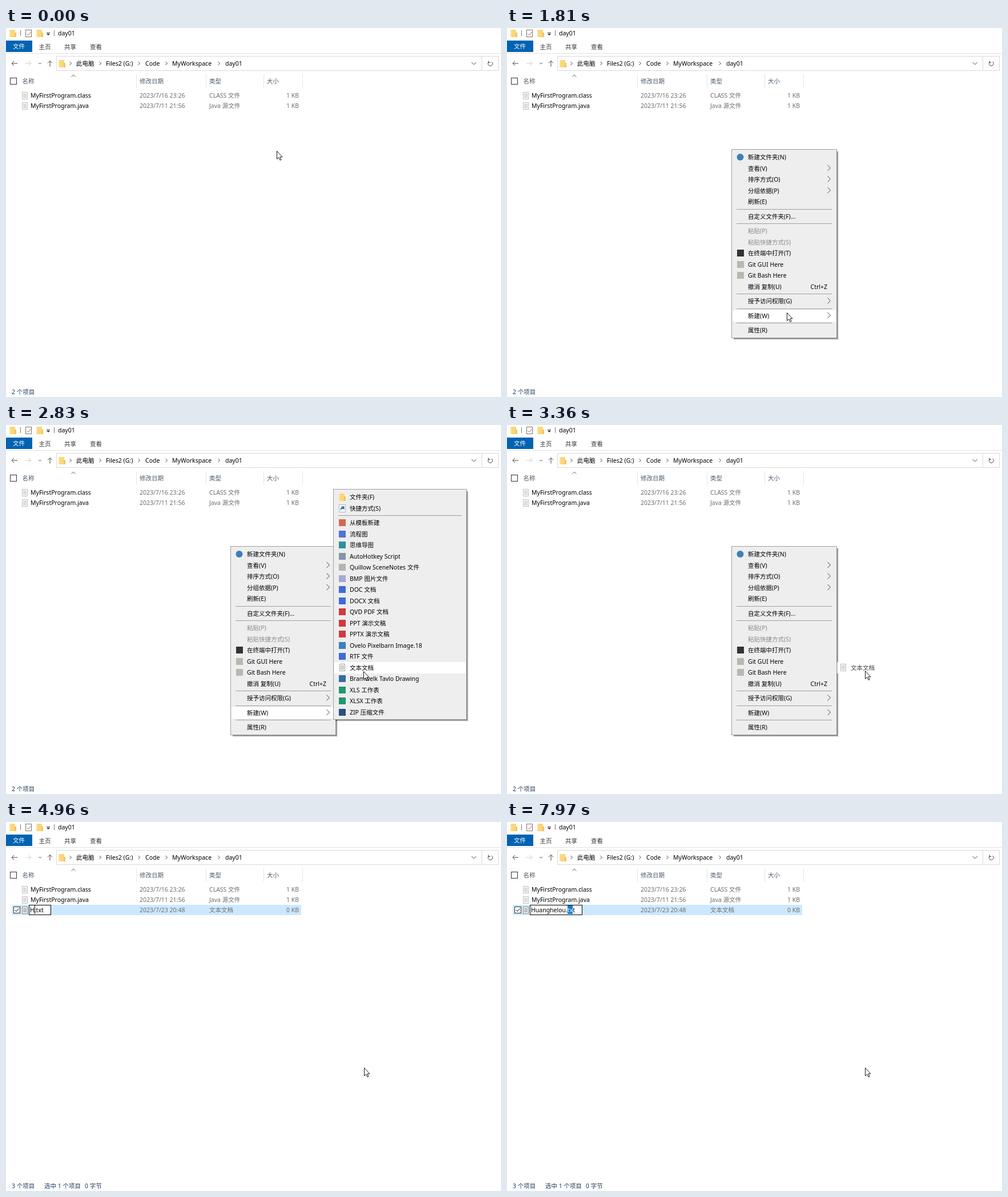
Write an HTML page that moves like this. It is 867 by 646 pixels and loops after 8000 ms.

```html
<!DOCTYPE html>
<html lang="zh-CN">
<head>
<meta charset="utf-8">
<title>day01</title>
<style>
html, body { margin: 0; width: 100%; height: 100%; overflow: hidden; background: #fff; }
body { position: relative; font: 10.5px/16px "Noto Sans", "Noto Sans CJK SC", "Noto Sans CJK", sans-serif; color: #000; }
svg { position: absolute; left: 0; top: 0; width: 867px; height: 646px; }
text { white-space: pre; }
rect { shape-rendering: crispEdges; }
.ln { fill: none; stroke: #444; stroke-width: 1; }
#edit { position: absolute; left: 40px; top: 145px; height: 16px; display: flex; white-space: pre;
  padding: 0 12px 0 1px; border: 1px solid #000; background: #fff; }
#edit mark { background: #0078d7; color: #fff; height: 15px; }
#edit i { width: 1px; height: 15px; margin-right: -1px; background: #000; }
</style>
</head>
<body>
<svg id="stage" viewBox="0 0 867 646"></svg>
<div id="edit"><span></span><mark></mark><i></i><span></span></div>
<script>
const $ = id => document.getElementById(id);
const rect = (x, y, w, h, fill, more = '') => `<rect x="${x}" y="${y}" width="${w}" height="${h}" fill="${fill}" ${more}/>`;
const text = (x, mid, s, fill = '#000', anchor = 'start') =>
  `<text x="${x}" y="${mid + 4}" fill="${fill}" text-anchor="${anchor}">${s}</text>`;
const line = (d, stroke = '#444') => `<path class="ln" d="${d}" style="stroke:${stroke}"/>`;
const group = (id, body) => `<g id="${id}">${body}</g>`;

// Icons, centred on x, y
const folder = (x, y) => rect(x - 6, y - 6, 10, 13, '#fbd67b') + rect(x + 3, y - 1, 3, 8, '#f3c55c') + rect(x - 6, y - 6, 2, 13, '#ffe29a');
const page = (x, y, ink = '#a5a5a5') => rect(x - 4.5, y - 6.5, 9, 12, '#fafafa', `stroke="${ink}"`) +
  [-4, -2, 0, 2].map(d => rect(x - 3, y + d, 6, 1, ink)).join('');
const square = color => (x, y) => rect(x - 6, y - 6, 12, 12, color);
const disc = color => (x, y) => `<circle cx="${x}" cy="${y}" r="6" fill="${color}"/>`;
const shortcut = (x, y) => rect(x - 5.5, y - 6.5, 11, 13, '#fff', 'stroke="#b5b5b5"') +
  `<path d="M${x - 3} ${y + 4}q0-5 3-5l-2-2h6v6l-2-2q-3 0-5 3z" fill="#1b6fb5"/>`;
const checkbox = (x, y) => rect(x + .5, y + .5, 11, 11, '#fff', 'stroke="#333"');

const chevron = (x, y) => line(`M${x - 1.5} ${y - 3}l3 3-3 3`);
const chevronDown = (x, y, s) => line(`M${x - s} ${y - s / 2}l${s} ${s} ${s}-${s}`);

// Menu rows: [label, icon, extra]; null is a separator
const blue = square('#4169d9'), red = square('#cf3a3c'), green = square('#23976d');
const git = square('#b9b8b0');
const mainRows = [
  ['新建文件夹(N)', disc('#3c7fb8')], ['查看(V)', 0, '>'], ['排序方式(O)', 0, '>'], ['分组依据(P)', 0, '>'], ['刷新(E)'],
  null, ['自定义文件夹(F)...'],
  null, ['粘贴(P)', 0, 'off'], ['粘贴快捷方式(S)', 0, 'off'], ['在终端中打开(T)', square('#333')],
  ['Git GUI Here', git], ['Git Bash Here', git], ['撤消 复制(U)', 0, 'Ctrl+Z'],
  null, ['授予访问权限(G)', 0, '>'],
  null, ['新建(W)', 0, '>'],
  null, ['属性(R)']
];
const subRows = [
  ['文件夹(F)', folder], ['快捷方式(S)', shortcut],
  null, ['从模板新建', square('#d2694f')], ['流程图', square('#4f74d6')], ['思维导图', square('#2f909a')],
  ['AutoHotkey Script', square('#8794a8')], ['Quillow SceneNotes 文件', square('#b4b4b4')],
  ['BMP 图片文件', square('#a3a9d6')], ['DOC 文档', blue], ['DOCX 文档', blue], ['QVD PDF 文档', red],
  ['PPT 演示文稿', red], ['PPTX 演示文稿', red], ['Ovelo Pixelbarn Image.18', square('#3b82bd')],
  ['RTF 文件', blue], ['文本文档', page], ['Bramwelk Tavlo Drawing', square('#356aa8')],
  ['XLS 工作表', green], ['XLSX 工作表', green], ['ZIP 压缩文件', square('#2b4f80')]
];

// Soft edge right and below: each layer reaches one pixel further
const shadow = (x, y, w, h) => [3, 2, 1].map(d =>
  rect(x + 4, y + 4, w - 4 + d, h - 4 + d, '#000', `opacity="${.4 - d * .1}"`)).join('');

function menu(id, x, y, w, h, rows) {
  const mids = [];
  let mid = y + 14, body = '';
  for (const row of rows) {
    if (!row) {
      body += rect(x + 9, Math.round(mid - 6.8), w - 18, 1, '#a0a0a0');
      mid += 6;
      continue;
    }
    const [label, icon, extra] = row;
    body += text(x + 29, mid, label, extra === 'off' ? '#8a8a8a' : '#000');
    if (icon) body += icon(x + 15.5, mid);
    if (extra === '>') body += line(`M${x + 168.5} ${mid - 5.5}l5 5-5 5`);
    if (extra === 'Ctrl+Z') body += text(x + 168, mid, extra, '#000', 'end');
    mids.push(mid);
    mid += 19.5;
  }
  const html = group(id, shadow(x, y, w, h) +
    rect(x + .5, y + .5, w - 1, h - 1, '#eee', 'stroke="#a0a0a0"') +
    rect(x + 2, 0, w - 4, 20, '#fff', `id="${id}Hot"`) + body);
  return { id, mids, html };
}
const main = menu('main', 393, 212, 185, 331, mainRows);
const sub = menu('sub', 573, 112, 234, 404, subRows);
const NEW_ROW = main.mids.length - 2, TXT_ROW = 15;
const txtMid = sub.mids[TXT_ROW];

const grey = '#6d6d6d', head = '#4c5a6b', navy = '#1e395b', pale = '#c0c0c0';
const fileRow = (mid, date, type, size) =>
  text(234, mid, date, grey) + text(356, mid, type, grey) + text(513, mid, size, grey, 'end');

$('stage').innerHTML =
  // title bar and tabs
  folder(12, 9) + rect(25, 4, 1, 10, '#777') +
  rect(34.5, 3.5, 10, 12, '#fff', 'stroke="#777"') + line('M36.5 10l2.5 2.5 4.5-5.5', '#d0563a') +
  folder(59, 9) + rect(71, 8, 6, 1, '#333') + '<path d="M71 10h6l-3 3z" fill="#333"/>' +
  rect(84, 4, 1, 10, '#777') + text(91, 9, 'day01') +
  rect(0, 22, 46, 20, '#0063b1') + text(22.5, 32, '文件', '#fff', 'middle') +
  text(57.5, 32.5, '主页', '#333') + text(102, 32.5, '共享', '#333') + text(147, 32.5, '查看', '#333') +
  rect(0, 44, 867, 1, '#e2e2e2') +
  // address bar
  line('M20 62H10M14 58l-4 4 4 4') + line('M34 62H44M40 58l4 4-4 4', '#ccc') + chevronDown(59.5, 62, 2.2) +
  line('M77 67.5V57.5M73 61.5l4-4 4 4') +
  rect(88.5, 49.5, 774, 25, '#fff', 'stroke="#d9d9d9"') + rect(833, 50, 1, 25, '#d9d9d9') + folder(98, 62) +
  [113, 165, 233, 281, 373].map(x => chevron(x, 62)).join('') +
  text(123, 61.5, '此电脑') + text(175, 61.5, 'Files2 (G:)') + text(244, 61.5, 'Code') +
  text(291, 61.5, 'MyWorkspace') + text(384, 61.5, 'day01') +
  chevronDown(819.5, 62, 4) + line('M846 59a4 4 0 1 0 4.5 0M845 57.5v3h3') +
  // column heads
  checkbox(7, 87) + text(28.5, 92.5, '名称', head) + text(234, 92.5, '修改日期', head) +
  text(356, 92.5, '类型', head) + text(457, 92.5, '大小', head) + line('M114.5 85.5l3.5-3.5 3.5 3.5', '#666') +
  [228, 350, 451, 519].map(x => rect(x, 81, 1, 24, '#e5e5e5')).join('') +
  // files
  page(32.5, 118.5, pale) + text(43, 118, 'MyFirstProgram.class') + fileRow(118, '2023/7/16 23:26', 'CLASS 文件', '1 KB') +
  page(32.5, 136.5, pale) + text(43, 136, 'MyFirstProgram.java') + fileRow(136, '2023/7/11 21:56', 'Java 源文件', '1 KB') +
  group('added', rect(10, 145, 507, 18, '#cce8ff') + checkbox(13, 148) + line('M15.5 154l2.5 2.5 4.5-5', '#000') +
    page(32.5, 154.5, '#8a8a8a') + fileRow(154, '2023/7/23 20:48', '文本文档', '0 KB')) +
  // status bar
  group('idle', text(10, 637, '2 个项目', navy)) +
  group('chosen', text(10, 637, '3 个项目', navy) + text(67, 637, '选中 1 个项目', navy) + text(138, 637, '0 字节', navy)) +
  '<circle id="ripple" cx="393" cy="212" r="9.5" fill="none" stroke="#000" opacity=".08"/>' +
  main.html + sub.html +
  group('flash', rect(578, txtMid - 10, 227, 20, '#fff') + page(588.5, txtMid) + text(602, txtMid, '文本文档')) +
  '<path id="cursor" d="M.5.5V14.5L3.7 11.5 6 16.5 8 15.6 5.9 10.8H10Z" fill="#fff" stroke="#000" stroke-width=".9"/>';

// Pointer moves: [start, end, steps, x, y]
const moves = [
  [370, 570, 4, 393, 212], [1260, 1810, 9, 490, 498], [2140, 2340, 4, 499, 498],
  [2410, 2550, 3, 580, 497], [2620, 2830, 4, 626, 431], [2960, 3030, 2, 627, 430]
];
// Share of a move done, advancing in n jumps with the first at a and the last at b
const stepped = (t, a, b, n) => t < a ? 0 : Math.min(n, Math.floor((t - a) / (b - a) * (n - 1) + 1.05)) / n;

function pointer(t) {
  let x = 474, y = 215;
  for (const [a, b, n, tx, ty] of moves) {
    const p = stepped(t, a, b, n), e = p * p * (3 - 2 * p);
    x += (tx - x) * e;
    y += (ty - y) * e;
    if (p < 1) break;
  }
  return [Math.round(x), Math.round(y)];
}

const show = (id, on) => $(id).style.display = on ? '' : 'none';
const fade = (id, v) => { show(id, v > 0); $(id).style.opacity = v; };
function hover(m, row) {
  show(m.id + 'Hot', row >= 0);
  if (row >= 0) $(m.id + 'Hot').setAttribute('y', Math.round(m.mids[row] - 10));
}

const name = 'Huanghelou', fresh = '新建文本文档';
const keys = [4960, 5160, 5250, 5340, 5430, 5840, 5890, 6240, 6440, 6510];
const [before, picked, caret, after] = $('edit').children;

function edit(pre, sel, post, blink) {
  before.textContent = pre;
  picked.textContent = sel;
  after.textContent = post;
  caret.style.visibility = blink ? 'visible' : 'hidden';
}
function rename(t) {
  if (t < 4960) edit('', fresh, '.txt', t < 4030 || t >= 4630);
  else if (t < 7440) edit(name.slice(0, keys.filter(k => k <= t).length), '', '.txt', t < 7040);
  else {
    const n = t < 7840 ? 0 : t < 7970 ? 1 : 2;
    edit(name + '.', 'txt'.slice(0, n), 'txt'.slice(n), n === 0);
  }
}

function draw(t) {
  const [x, y] = pointer(t);
  $('cursor').setAttribute('transform', `translate(${x} ${y})`);
  const rowAt = m => m.mids.findIndex(c => Math.abs(c - y) < 9.8);
  const live = t >= 1260 && t < 3290;
  hover(main, !live ? -1 : x >= 573 ? NEW_ROW : x > 394 ? rowAt(main) : -1);
  hover(sub, live && x >= 573 ? rowAt(sub) : -1);

  show('ripple', t >= 570 && t < 720);
  fade('main', t < 3430 ? Math.sin(stepped(t, 720, 990, 5) * Math.PI / 2) : 0);
  fade('sub', t < 3290 ? Math.sin(stepped(t, 2140, 2340, 4) * Math.PI / 2) : 0);
  fade('flash', t < 3290 ? 0 : 1.25 - 1.25 * Math.max(.2, stepped(t, 3290, 3560, 5)));

  const added = t >= 3560;
  show('added', added);
  show('edit', added);
  show('idle', t < 3630);
  show('chosen', t >= 3630);
  if (added) rename(t);
}

let start;
function tick(now) {
  start ??= now;
  draw((now - start) % 8000);
  requestAnimationFrame(tick);
}
draw(0);
requestAnimationFrame(tick);
</script>
</body>
</html>
```
